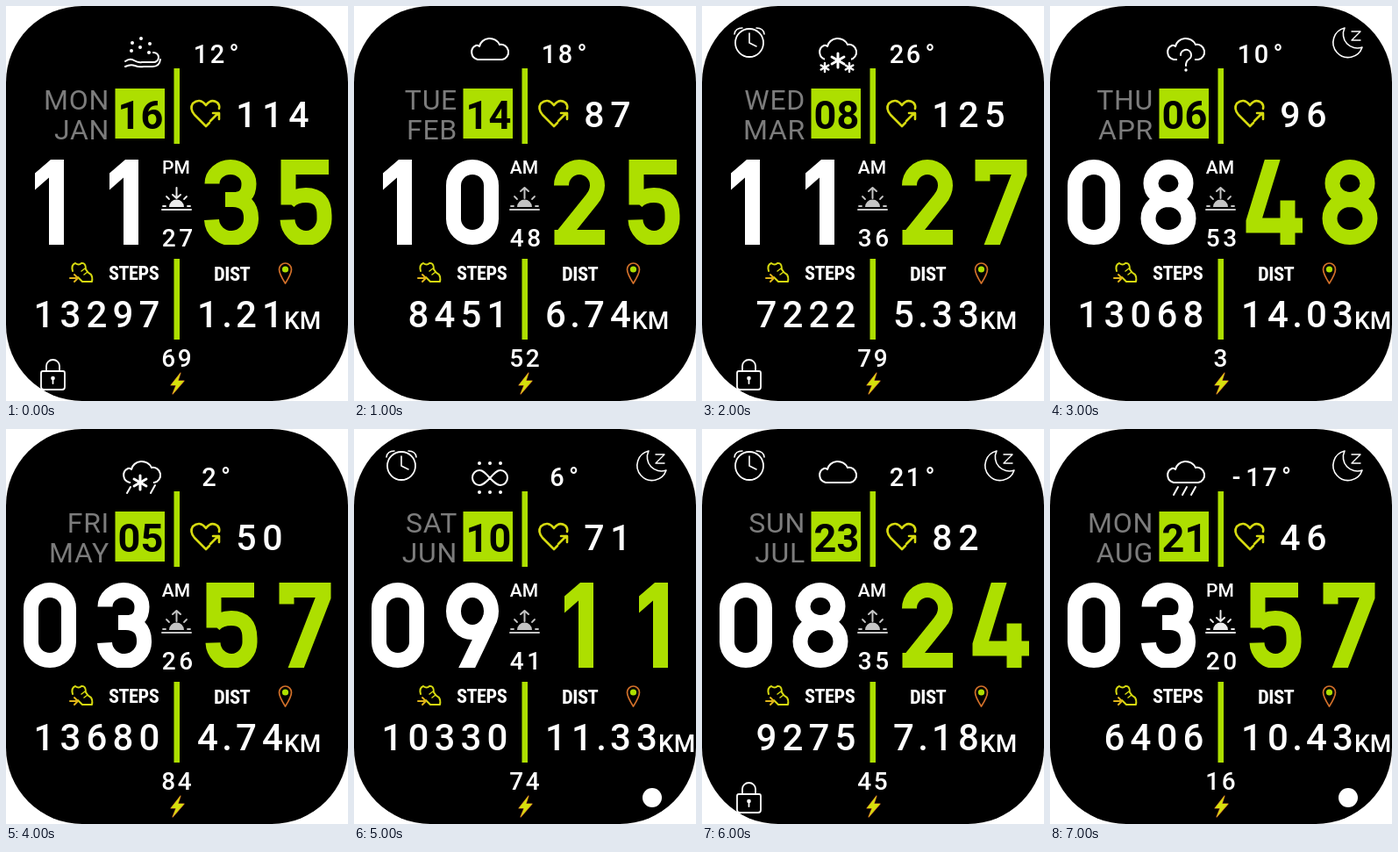
Write an HTML page with a canvas that moves like this. It is 390 by 450 pixels and loops after 8 s.

```html
<!DOCTYPE html>
<html lang="en">
<head>
<meta charset="utf-8">
<title>Watch face</title>
<style>
  html, body { margin: 0; width: 100%; height: 100%; overflow: hidden; background: #fff; }
  canvas { display: block; }
</style>
</head>
<body>
<canvas id="face" width="390" height="450"></canvas>
<script>
const ctx = document.getElementById('face').getContext('2d');
const GREEN = '#addf00', WHITE = '#fff', GREY = '#7c7c7c', GOLD = '#d6da10', ORANGE = '#d2702a';
const STEP = 1000;

const states = [
  { day: 'MON', month: 'JAN', date: '16', pulse: '114', hour: '11', min: '35', half: 'PM', sec: '27',
    steps: '13297', dist: '1.21', temp: '12°', power: '69', sky: 'wind', on: ['lock'] },
  { day: 'TUE', month: 'FEB', date: '14', pulse: '87', hour: '10', min: '25', half: 'AM', sec: '48',
    steps: '8451', dist: '6.74', temp: '18°', power: '52', sky: 'cloud', on: [] },
  { day: 'WED', month: 'MAR', date: '08', pulse: '125', hour: '11', min: '27', half: 'AM', sec: '36',
    steps: '7222', dist: '5.33', temp: '26°', power: '79', sky: 'snow', on: ['alarm', 'lock'] },
  { day: 'THU', month: 'APR', date: '06', pulse: '96', hour: '08', min: '48', half: 'AM', sec: '53',
    steps: '13068', dist: '14.03', temp: '10°', power: '3', sky: 'unknown', on: ['moon'] },
  { day: 'FRI', month: 'MAY', date: '05', pulse: '50', hour: '03', min: '57', half: 'AM', sec: '26',
    steps: '13680', dist: '4.74', temp: '2°', power: '84', sky: 'sleet', on: [] },
  { day: 'SAT', month: 'JUN', date: '10', pulse: '71', hour: '09', min: '11', half: 'AM', sec: '41',
    steps: '10330', dist: '11.33', temp: '6°', power: '74', sky: 'haze', on: ['alarm', 'moon', 'link'] },
  { day: 'SUN', month: 'JUL', date: '23', pulse: '82', hour: '08', min: '24', half: 'AM', sec: '35',
    steps: '9275', dist: '7.18', temp: '21°', power: '45', sky: 'cloud', on: ['alarm', 'moon', 'lock'] },
  { day: 'MON', month: 'AUG', date: '21', pulse: '46', hour: '03', min: '57', half: 'PM', sec: '20',
    steps: '6406', dist: '10.43', temp: '-17°', power: '16', sky: 'rain', on: ['moon', 'link'] }
];

// Centre lines of the large numerals; the 1 is a filled outline.
const numerals = {
  0: 'M-21.5 21A21.5 21 0 0 1 21.5 21V59A21.5 21 0 0 1-21.5 59Z',
  1: 'M-17 7L1-8.5H16V88.5H-1V12L-17 26Z',
  2: 'M-20.5 21A20.5 21 0 0 1 20.5 21Q20.5 29 14 37L-19 78M-28.5 80H29',
  3: 'M-22 19A21 19 0 0 1 20 19Q20 37 2 37H-7M2 37Q22.5 38 22.5 58A22.5 22 0 0 1-22.5 60',
  4: 'M-1-16L-25 62V66.5H31M14 38V90',
  5: 'M26 0H-20V43M-20 40Q-13 32 0 32Q21 32 21 55V58A21 22 0 0 1-21 60',
  7: 'M-22 16V0H20V8L-15 98',
  8: 'M0 0A20 18.5 0 0 1 0 37A20 18.5 0 0 1 0 0ZM0 37A23 21.5 0 0 1 0 80A23 21.5 0 0 1 0 37Z',
  9: 'M-21.5 24A21.5 24 0 0 1 21.5 24A21.5 24 0 0 1-21.5 24ZM20.5 31Q18 39-11 98'
};

function line(d, color = WHITE, width = 2) {
  ctx.strokeStyle = color;
  ctx.lineWidth = width;
  ctx.stroke(new Path2D(d));
}

function fill(d, color = WHITE) {
  ctx.fillStyle = color;
  ctx.fill(new Path2D(d));
}

function disc(x, y, r, color = WHITE) {
  ctx.fillStyle = color;
  ctx.beginPath();
  ctx.arc(x, y, r, 0, Math.PI * 2);
  ctx.fill();
}

function ring(x, y, r, color = WHITE, width = 2) {
  ctx.strokeStyle = color;
  ctx.lineWidth = width;
  ctx.beginPath();
  ctx.arc(x, y, r, 0, Math.PI * 2);
  ctx.stroke();
}

function text(str, x, y, size, { color = WHITE, weight = 500, align = 'left', spacing = 0 } = {}) {
  ctx.font = `${weight} ${size}px Roboto, sans-serif`;
  ctx.letterSpacing = `${spacing}px`;
  ctx.textAlign = align;
  ctx.fillStyle = color;
  ctx.fillText(str, x, y);
}

// One character per cell, the first cell centred on x.
function cells(str, x, y, size, pitch, style = {}) {
  [...str].forEach((ch, i) => text(ch, x + i * pitch, y, size, { ...style, align: 'center' }));
}

function centredCells(str, x, y, size, pitch) {
  cells(str, x - (str.length - 1) * pitch / 2, y, size, pitch);
}

// Uses a condensed face where there is one, at the largest size that fits.
function label(str, x, middle, room) {
  const font = size => `600 condensed ${size}px "Roboto Condensed", "Open Sans", sans-serif`;
  const full = 33;
  ctx.letterSpacing = '-0.5px';
  ctx.font = font(full);
  const size = Math.min(full, full * room / ctx.measureText(str).width);
  ctx.font = font(size);
  ctx.textAlign = 'left';
  ctx.fillStyle = WHITE;
  ctx.fillText(str, x, middle + size * 0.357);
}

function bigDigits(str, x, color) {
  ctx.lineCap = 'butt';
  ctx.lineJoin = 'miter';
  [...str].forEach((ch, i) => {
    ctx.save();
    ctx.translate(x + i * 85, 183.5);
    ctx.beginPath();
    ctx.rect(-40, -8.5, 80, 97);
    ctx.clip();
    if (ch === '1') fill(numerals[1], color);
    else line(numerals[ch], color, 17);
    ctx.restore();
  });
  ctx.lineCap = ctx.lineJoin = 'round';
}

function distance(str) {
  let x = 230;
  for (const ch of str) {
    const dot = ch === '.';
    text(ch, dot ? x - 8 : x, 366, 42, { align: 'center' });
    x += dot ? 14 : 30;
  }
  text('KM', x - 17, 367.5, 28);
}

function flake(x, y, r, width) {
  for (let i = 0; i < 3; i++) {
    const a = Math.PI * (i / 3 + 0.5), dx = r * Math.cos(a), dy = r * Math.sin(a);
    line(`M${x - dx} ${y - dy}L${x + dx} ${y + dy}`, WHITE, width);
  }
}

function cloud(gap = 0) {
  line('M155 61H141A8.5 8.5 0 0 1 139 45Q141 44 143 46A12 11 0 0 1 166 44A8.5 8.5 0 0 1 169 61H155');
  if (gap) {
    ctx.fillStyle = '#000';
    ctx.fillRect(155 - gap, 55, gap * 2, 9);
  }
}

const skies = {
  wind() {
    [[154, 37], [144, 42], [164, 43], [153, 47], [143, 51], [163, 53]].forEach(([x, y]) => disc(x, y, 2));
    line('M136 63Q141 59 146 62T155 64H168A6 5.5 0 0 0 168 53M136 69Q142 66 147 68T157 69H167Q175 69 176 61');
  },
  cloud() { cloud(); },
  snow() {
    cloud(15);
    flake(155, 62, 8, 3);
    flake(140, 70, 5, 2.4);
    flake(168, 70, 5, 2.4);
  },
  unknown() {
    cloud(10);
    line('M149 56A6 6 0 1 1 158 61Q155 63 155 68');
    disc(155, 73, 1.7);
  },
  sleet() {
    cloud(13);
    flake(153, 61, 8, 3);
    line('M142 66L138 73M170 64L165 73');
  },
  haze() {
    for (const x of [143, 155, 167]) {
      disc(x, 39, 2);
      disc(x, 72, 2);
    }
    line('M155 56C150 50 147 47 143 47A8 8.5 0 0 0 143 64C147 64 150 61 155 56C160 50 163 47 167 47A8 8.5 0 0 1 167 64C163 64 160 61 155 56Z');
  },
  rain() {
    cloud();
    line('M146 66L141 75M156 66L151 75M166 66L161 75');
  }
};

const badges = {
  alarm() {
    ring(54, 42, 16, WHITE, 1.8);
    line('M37 32Q38 25 46 25M62 25Q70 25 71 32M54 31V42L62 46', WHITE, 1.6);
  },
  moon() {
    line('M336 25A17 17 0 1 0 356 47A16 16 0 0 1 336 25Z', WHITE, 1.6);
    line('M344 29H354L344 39H354', WHITE, 1.4);
  },
  lock() {
    line('M42 416H65Q67 416 67 418V434Q67 437 64 437H43Q40 437 40 434V418Q40 416 42 416ZM46 416V410A7.5 7 0 0 1 61 410V416', WHITE, 1.8);
    disc(53.5, 424, 2.3);
    line('M53.5 425V430', WHITE, 1.8);
  },
  link() { disc(340, 420, 11); }
};

function horizon(rising) {
  const color = rising ? '#c4c4c4' : '#ececec';
  line('M178 232H211', color, 2);
  fill('M186 229A8.5 8.5 0 0 1 203 229Z', color);
  line('M179 228H182M207 228H210M183 217L186 220M206 217L203 220', color, 1.8);
  line(rising ? 'M194.5 219V207M190 211L194.5 207L199 211'
              : 'M194.5 207V219M190 215L194.5 219L199 215', color, 2);
}

function heart() {
  line('M227 136L215 124Q209 117 213 111Q221 104 228 113Q234 105 241 110Q244 113 243 117', GOLD, 2.6);
  line('M228 137L232 133M233 131L242 122M236 122H243V129', GOLD, 2.6);
}

function shoe() {
  line('M76 302Q74 295 79 293Q83 296 86 293Q91 292 91 300Q93 304 97 306Q99 309 98 314H87L82 309', GOLD, 2);
  line('M86 302L90 299M89 306L93 303', GOLD, 1.5);
  line('M73 310H82M78 306L82 310L78 314', '#e0b41a', 2);
}

function pin() {
  line('M318.5 316Q311.5 305 311.5 300A7 7 0 0 1 325.5 300Q325.5 305 318.5 316Z', ORANGE, 1.7);
  disc(318.5, 300, 3.6, GREEN);
}

function bolt() {
  const d = 'M199 418L188 432H194L190 442L203 427H196Z';
  line(d, ORANGE, 1.2);
  fill(d, '#d6e00c');
}

function draw(s) {
  ctx.fillStyle = WHITE;
  ctx.fillRect(0, 0, 390, 450);
  ctx.fillStyle = '#000';
  ctx.beginPath();
  ctx.roundRect(0, 0, 390, 450, 87);
  ctx.fill();
  ctx.lineCap = ctx.lineJoin = 'round';

  ctx.fillStyle = GREEN;
  ctx.fillRect(191.5, 71, 6.5, 86);
  ctx.fillRect(191.5, 288, 6.5, 92);
  ctx.fillRect(124.5, 94, 56.5, 57);

  skies[s.sky]();
  s.on.forEach(name => badges[name]());
  heart();
  shoe();
  pin();
  bolt();
  horizon(s.half === 'AM');

  const calendar = { color: GREY, weight: 400, align: 'right', spacing: 0.7 };
  text(s.day, 118, 118, 32, calendar);
  text(s.month, 118, 152, 32, calendar);
  cells(s.date, 140.5, 140, 45, 26, { color: '#000', weight: 700 });
  centredCells(s.temp, 241, 65, 29, 19);
  cells(s.pulse, 274, 138, 41, 30);
  text(s.half, 194, 190.5, 21, { align: 'center' });
  centredCells(s.sec, 195.5, 274, 28, 19.5);
  centredCells(s.power, 194.5, 411, 28, 18.5);
  cells(s.steps, 163.5 - (s.steps.length - 1) * 30, 366, 42, 30);
  distance(s.dist);
  label('STEPS', 117, 304.5, 58);
  label('DIST', 237, 304.5, 42);

  bigDigits(s.hour, 50, WHITE);
  bigDigits(s.min, 257, GREEN);
}

const start = performance.now();
function tick() {
  const elapsed = performance.now() - start;
  draw(states[Math.floor(elapsed / STEP) % states.length]);
  requestAnimationFrame(tick);
}
tick();
</script>
</body>
</html>
```
